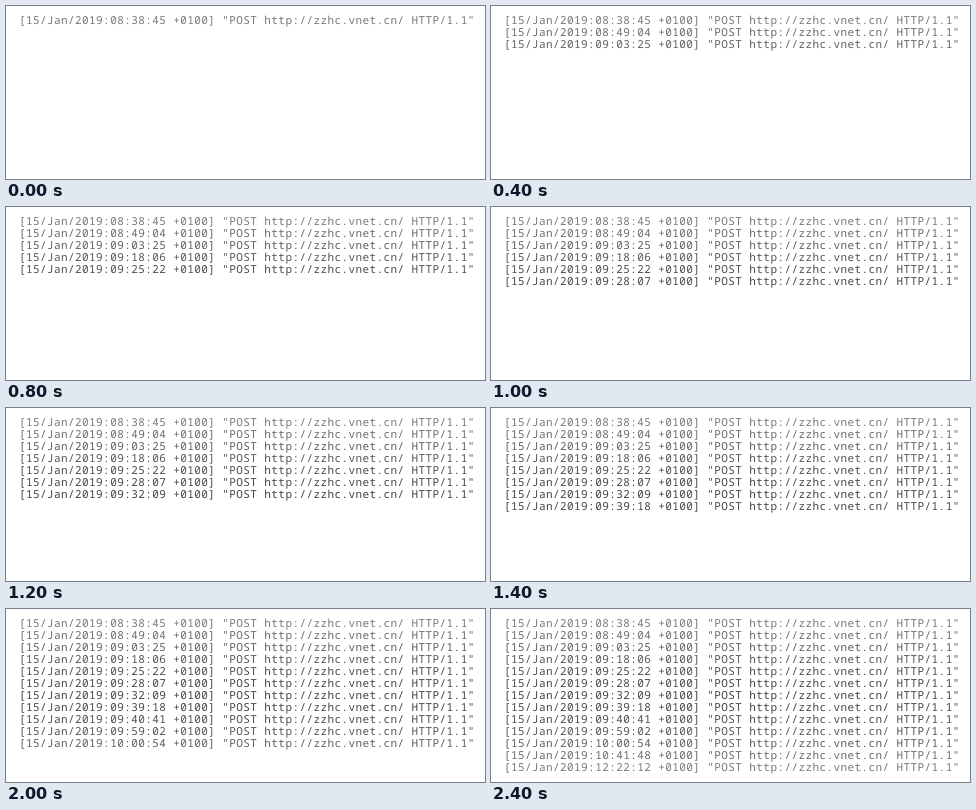
Write an HTML page that moves like this. It is 479 by 173 pixels and loops after 2600 ms.

```html
<!DOCTYPE html>
<html lang="en">
<head>
<meta charset="utf-8">
<title>Request log</title>
<style>
  html, body { margin: 0; width: 100%; height: 100%; overflow: hidden; background: #fff; }
  svg { display: block; width: 479px; height: 173px; }
  text { font: 11px "Noto Sans Mono", "DejaVu Sans Mono", monospace; letter-spacing: .41px; white-space: pre; text-rendering: geometricPrecision; }
</style>
</head>
<body>
<svg id="log" viewBox="0 0 479 173"></svg>
<script>
const STEP = 200, ROW = 12, LEFT = 13, BASE = 18;
const times = [
  "08:38:45", "08:49:04", "09:03:25", "09:18:06", "09:25:22", "09:28:07", "09:32:09",
  "09:39:18", "09:40:41", "09:59:02", "10:00:54", "10:41:48", "12:22:12"
];
const loop = times.length * STEP;
const log = document.getElementById("log");

// Ink is darkest in the middle rows and fades towards both ends.
const ink = i => {
  const g = Math.round(66 + 54 * (Math.abs(i - 6) / 6) ** 1.5);
  return `rgb(${g},${g},${g})`;
};

const rows = times.map((time, i) => {
  const row = document.createElementNS("http://www.w3.org/2000/svg", "text");
  row.setAttribute("x", LEFT);
  row.setAttribute("y", BASE + i * ROW);
  row.setAttribute("fill", ink(i));
  row.textContent = `[15/Jan/2019:${time} +0100] "POST http://zzhc.vnet.cn/ HTTP/1.1"`;
  return log.appendChild(row);
});

const start = performance.now();
function draw(now) {
  const shown = Math.floor((Math.max(0, now - start) % loop) / STEP);
  rows.forEach((row, i) => row.setAttribute("visibility", i <= shown ? "visible" : "hidden"));
  requestAnimationFrame(draw);
}
draw(start);
</script>
</body>
</html>
```
